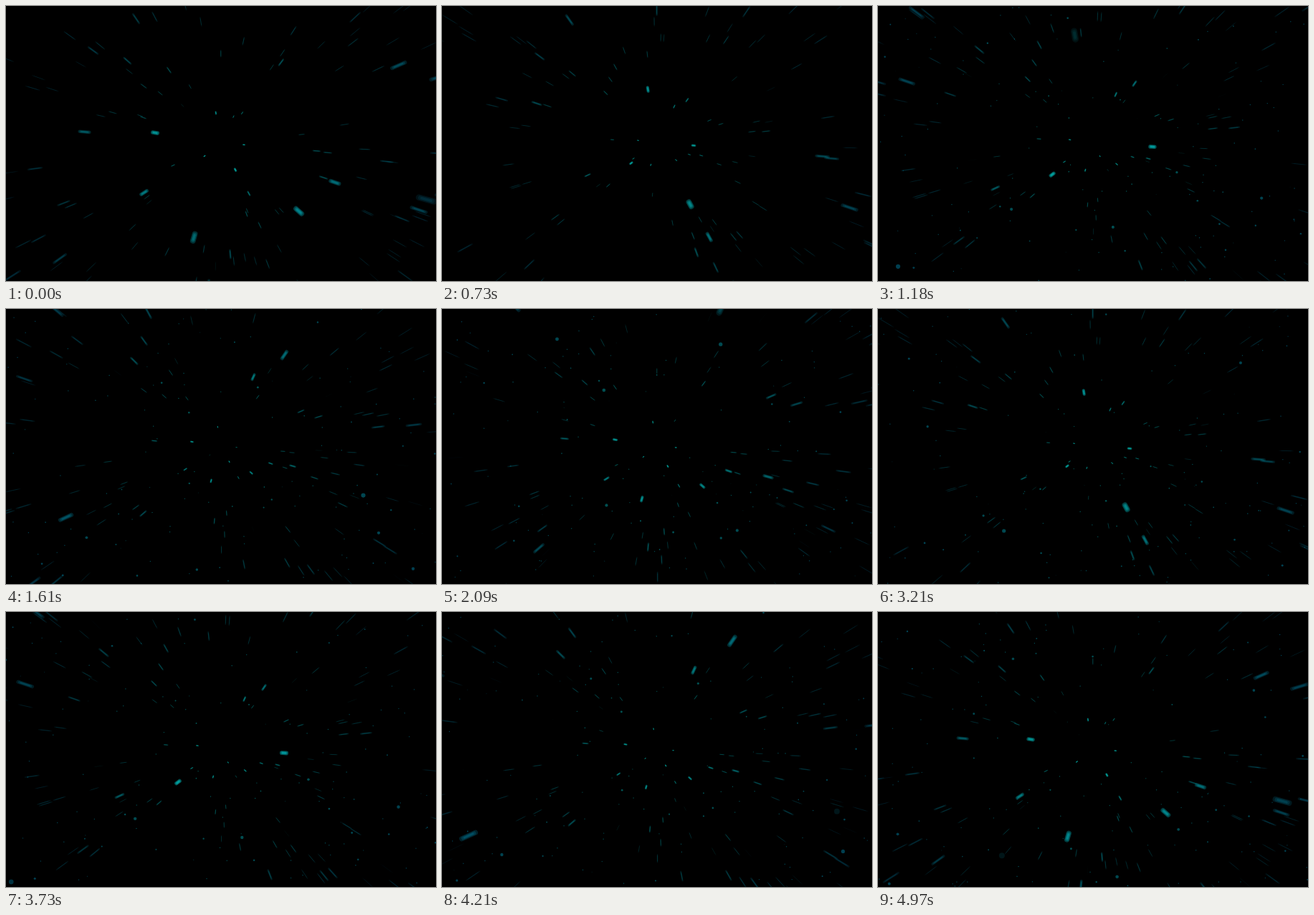
These frames come from a looping animation (600 by 383 pixels, 5000 ms). An HTML page with a canvas:

```html
<!DOCTYPE html>
<html>
<head>
<meta charset="utf-8">
<title>Warp field</title>
<style>
  html, body { margin: 0; background: #000; overflow: hidden; }
  canvas { display: block; }
</style>
</head>
<body>
<canvas id="stage" width="600" height="383"></canvas>
<script>
const ctx = document.getElementById('stage').getContext('2d');
const W = 600, H = 383, CX = 300, CY = 191.5;
const FPS = 24, FRAMES = 120, CYCLE = 60;
const NEAR = 10, FAR = NEAR + CYCLE, REF = 20;
const DOTS_FROM = 24;
const SMEAR = 0.036;

// Stars that pass close by: x, y from the centre at depth REF, and starting depth.
const closeStars = [
  [-80, -13, 17.4], [-102, 65, 19], [-24, 83, 12.7], [76, 66, 14],
  [169, 46, 11.8], [135, 46, 17], [223, -98, 18], [-200, -17, 21],
  [30, 55, 30], [-14, -83, 39], [-54, 41, 47], [73, 4, 45.6],
  [-184, 84, 55], [71, 127, 36.5], [84, -121, 57], [54, -116, 62]
];

let seed = 7;
function random() {
  seed = (seed * 16807) % 2147483647;
  return seed / 2147483647;
}

// Stars spread evenly over the field, outside a clear core around the flight path.
function scatter(count, core) {
  const stars = [];
  while (stars.length < count) {
    const x = (random() * 2 - 1) * 1000, y = (random() * 2 - 1) * 640;
    if (Math.hypot(x, y) > core) stars.push([x, y, NEAR + random() * CYCLE]);
  }
  return stars;
}

const streaks = closeStars.concat(scatter(235, 240));
const dots = scatter(330, 90);
const clamp = v => Math.max(0, Math.min(1, v));

function project([x0, y0, depth], frame) {
  const z = NEAR + (depth - NEAR - frame % CYCLE + CYCLE) % CYCLE;
  const x = x0 * REF / z, y = y0 * REF / z;
  return {
    x, y,
    r: Math.hypot(x, y),
    size: 100 / z - 0.6,
    fade: clamp((z - NEAR) / 4) * clamp((FAR - z) / 4)
  };
}

function tint(r) {
  const edge = clamp(r / 300);
  return `rgb(0,${230 - 65 * edge},${215 - 5 * edge})`;
}

// Nested strokes give the streak a bright core and soft ends.
function drawStreak({ x, y, r, size, fade }) {
  ctx.strokeStyle = tint(r);
  ctx.globalAlpha = 0.45 * fade * Math.min(0.95, 0.06 + 1.6 * size / (size + 0.075 * r));
  for (const part of [1, 0.7, 0.4]) {
    const reach = SMEAR * (0.4 + 0.6 * part);
    ctx.lineWidth = Math.max(1, size * part * 1.1);
    ctx.beginPath();
    ctx.moveTo(CX + x * (1 - reach), CY + y * (1 - reach));
    ctx.lineTo(CX + x * (1 + reach), CY + y * (1 + reach));
    ctx.stroke();
  }
}

function drawDot({ x, y, r, size, fade }) {
  ctx.fillStyle = tint(r);
  ctx.globalAlpha = fade * 0.38;
  ctx.beginPath();
  ctx.arc(CX + x, CY + y, Math.max(0.7, size * 0.48), 0, Math.PI * 2);
  ctx.fill();
}

function render(now) {
  const frame = Math.floor(now * FPS / 1000) % FRAMES;
  ctx.globalAlpha = 1;
  ctx.fillStyle = '#000';
  ctx.fillRect(0, 0, W, H);
  ctx.lineCap = 'round';
  if (frame >= DOTS_FROM) dots.forEach(star => drawDot(project(star, frame)));
  streaks.forEach(star => drawStreak(project(star, frame)));
}

const start = performance.now();
function tick() {
  render(performance.now() - start);
  requestAnimationFrame(tick);
}
tick();
</script>
</body>
</html>
```
